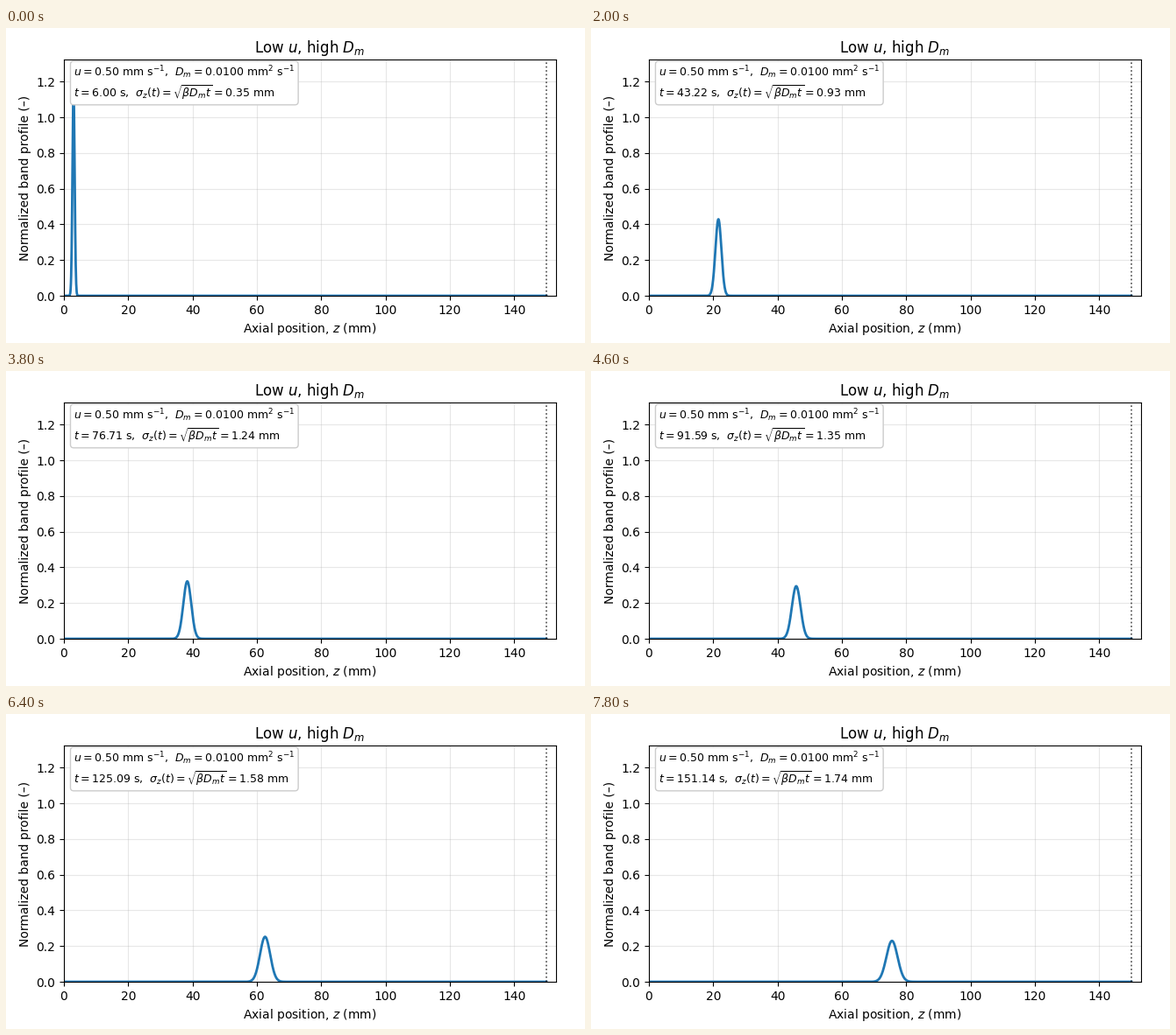
These frames come from a looping animation (660 px wide and 360 px high, 8 s). A matplotlib script:

```python
import numpy as np
import matplotlib.pyplot as plt
from matplotlib.animation import FuncAnimation

U, DM, BETA = 0.50, 0.0100, 2.0   # mm/s, mm^2/s, spreading factor
LENGTH = 150.0                    # mm
FRAMES, INTERVAL = 40, 200
times = np.linspace(6.0, LENGTH / U, 80)[:FRAMES]
z = np.linspace(0, LENGTH, 2000)


def sigma(t):
    return np.sqrt(BETA * DM * t)


def band(t):
    s = sigma(t)
    return np.exp(-0.5 * ((z - U * t) / s) ** 2) / (s * np.sqrt(2 * np.pi))


def caption(t):
    return (
        rf"$u={U:.2f}\ \mathrm{{mm\ s^{{-1}}}}$,  "
        rf"$D_m={DM:.4f}\ \mathrm{{mm^2\ s^{{-1}}}}$" "\n"
        rf"$t={t:.2f}\ \mathrm{{s}}$,  "
        rf"$\sigma_z(t)=\sqrt{{\beta D_m t}}={sigma(t):.2f}\ \mathrm{{mm}}$"
    )


fig, ax = plt.subplots(figsize=(6.6, 3.6), dpi=100)
fig.subplots_adjust(left=0.10, right=0.95, bottom=0.15, top=0.90)
ax.set_xlim(0, 1.02 * LENGTH)
ax.set_ylim(0, 1.15 * band(times[0]).max())
ax.set_xlabel(r"Axial position, $z$ (mm)")
ax.set_ylabel("Normalized band profile (–)")
ax.set_title(r"Low $u$, high $D_m$")
ax.grid(True, alpha=0.3)
curve, = ax.plot([], [], color="tab:blue", linewidth=2)
ax.axvline(LENGTH, color="k", linestyle=":", linewidth=1.2, alpha=0.7)
label = ax.text(
    0.02, 0.98, "", transform=ax.transAxes, ha="left", va="top", fontsize=9,
    bbox=dict(boxstyle="round,pad=0.3", facecolor="white", edgecolor="0.8"),
)


def update(i):
    t = times[i]
    curve.set_data(z, band(t))
    label.set_text(caption(t))
    return curve, label


anim = FuncAnimation(fig, update, frames=FRAMES, interval=INTERVAL,
                     init_func=lambda: update(0), repeat=True, repeat_delay=0)
plt.show()
```
